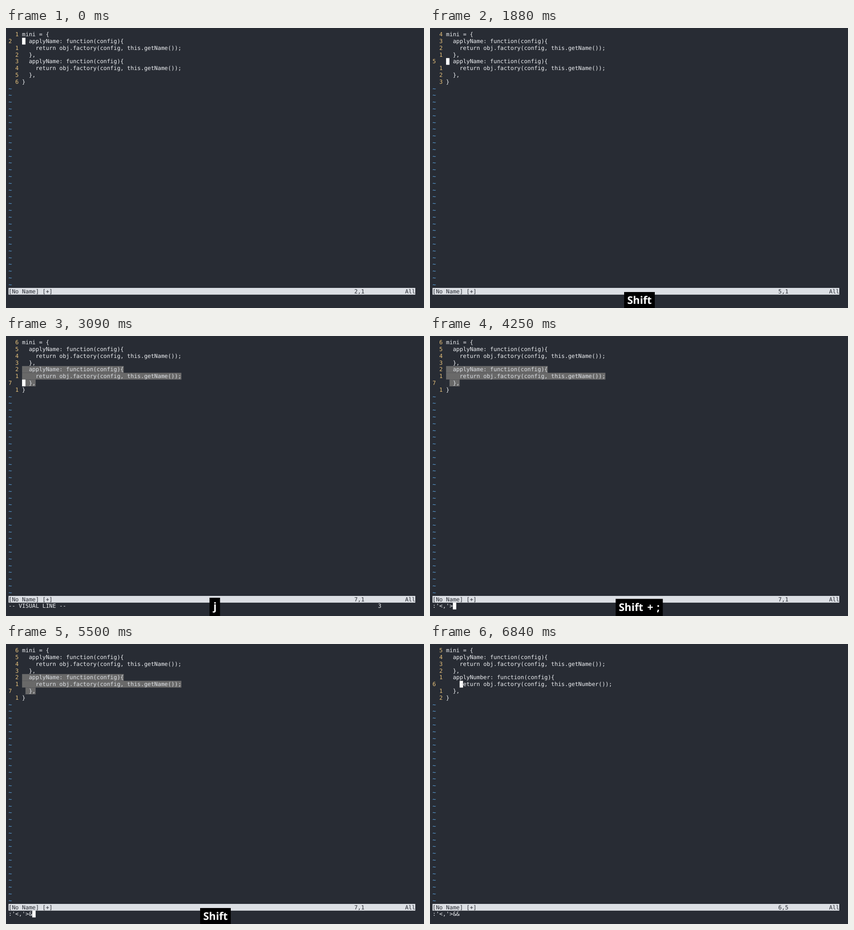
These frames come from a looping animation (913 px wide and 613 px high, 6960 ms). An HTML page:

```html
<!DOCTYPE html>
<html lang="en">
<head>
<meta charset="utf-8">
<title>Repeat a substitution on a selection</title>
<style>
html, body { margin: 0; width: 100%; height: 100%; overflow: hidden; background: #282c34; }
svg { display: block; }
text { white-space: pre; text-rendering: geometricPrecision; }
.term text { font: 12.3px "DejaVu Sans Mono", monospace; }
.keys text { font: bold 23px "Open Sans", "Noto Sans", sans-serif; fill: #fff; text-anchor: middle; }
</style>
</head>
<body>
<svg width="913" height="613" viewBox="0 0 913 613">
  <rect width="913" height="613" fill="#282c34"/>
  <g class="term" id="term"></g>
  <g class="keys" id="keys"></g>
</svg>
<script>
const LOOP = 6960;
const CW = 7.404, RH = 14.8, LEFT = 5.5, TOP = 6.6;
const GUTTER = 4, COLS = 120, STATUS = 38, CMD = 39;
const FG = '#eef0f3', DIM = '#dcdfe4', BG = '#282c34';
const YELLOW = '#e5c07b', BLUE = '#61afef', SELECTED = '#696969';

const method = word => [
  `  apply${word}: function(config){`,
  `    return obj.factory(config, this.get${word}());`,
  '  },'
];
const source = second => ['mini = {', ...method('Name'), ...method(second), '}'];

// Editor states: each entry changes some fields from its time on.
const edits = [
  [0, { row: 1, col: 0, word: 'Name', sel: -1, cmd: '', typing: false, pending: '' }],
  [280, { pending: '3' }],
  [550, { row: 4, pending: '' }],
  [2160, { sel: 4, cmd: '-- VISUAL LINE --', pending: '1' }],
  [2890, { row: 5, pending: '2' }],
  [3090, { row: 6, pending: '3' }],
  [4190, { cmd: ":'<,'>", typing: true, pending: '' }],
  [5500, { cmd: ":'<,'>&" }],
  [5700, { cmd: ":'<,'>&&" }],
  [5970, { row: 5, col: 4, word: 'Number', sel: -1, typing: false }]
];

// Key badges: left, right, top, baseline, then words with their centres.
const shift = x => [['Shift', x + 33.5], ['+', x + 75.5]];
const badges = {
  three: [444.5, 467.5, 579, 605, [['3', 456]]],
  threeJ: [434, 481, 573, 600, [['3', 447.5], ['j', 470.5]]],
  j: [444.5, 467.5, 573, 600, [['j', 456.5]]],
  shift: [424, 491, 578, 604, [['Shift', 457.5]]],
  shiftV: [401, 513, 578, 604, [...shift(401), ['v', 498]]],
  shiftVJ: [391, 523, 573, 600, [...shift(391), ['v', 488], ['j', 512]]],
  colon: [405.5, 508.5, 575.5, 602, [...shift(405.5), [';', 498.5]]],
  colonShift: [372, 543, 575.5, 602, [...shift(372), [';', 465], ['Shift', 508.5]]],
  amp: [401, 513, 578, 604, [...shift(401), ['7', 497.5]]],
  ampEnter: [365.5, 549, 578, 604, [...shift(365.5), ['7', 462], ['Enter', 512.5]]],
  enter: [421, 494, 579, 604, [['Enter', 457.5]]]
};
const presses = [
  [0, ''], [330, 'three'], [610, 'threeJ'], [1150, 'j'], [1430, ''],
  [1880, 'shift'], [2160, 'shiftV'], [2950, 'shiftVJ'], [3010, 'j'], [3910, ''],
  [4040, 'shift'], [4250, 'colon'], [5040, 'colonShift'], [5110, 'shift'],
  [5600, 'amp'], [5970, 'ampEnter'], [6560, 'enter'], [6840, '']
];

const term = document.getElementById('term');
const keys = document.getElementById('keys');
const escape = s => s.replace(/&/g, '&amp;').replace(/</g, '&lt;').replace(/>/g, '&gt;');
const colX = col => LEFT + col * CW;
const rowY = row => TOP + row * RH;

function rect(x, y, w, h, fill) {
  return `<rect x="${x}" y="${y}" width="${w}" height="${h}" fill="${fill}"/>`;
}
function cells(row, col, count, fill) {
  return rect(colX(col), rowY(row), count * CW, RH, fill);
}
function text(row, col, str, fill) {
  return `<text x="${colX(col)}" y="${rowY(row) + 11.5}" fill="${fill}">${escape(str)}</text>`;
}

function drawLine(line, i, s) {
  const here = i === s.row;
  const marked = s.sel >= 0 && i >= s.sel && i <= s.row;
  let out = text(i, here ? 0 : 2, String(here ? i + 1 : Math.abs(i - s.row)), YELLOW);
  if (marked) out += cells(i, GUTTER, line.length, SELECTED);
  if (here && (marked || !s.typing)) out += cells(i, GUTTER + s.col, 1, s.typing ? BG : '#fff');
  const start = line.search(/\S/);
  const body = line.slice(start);
  if (here && s.col === start) {
    out += text(i, GUTTER + start, body[0], DIM);
    return out + text(i, GUTTER + start + 1, body.slice(1), FG);
  }
  return out + text(i, GUTTER + start, body, marked ? DIM : FG);
}

function drawTerm(s) {
  const lines = source(s.word);
  let out = lines.map((line, i) => drawLine(line, i, s)).join('');
  for (let i = lines.length; i < STATUS; i++) out += text(i, 0, '~', BLUE);
  out += cells(STATUS, 0, COLS, DIM);
  out += text(STATUS, 0, '[No Name] [+]', BG);
  out += text(STATUS, 102, `${s.row + 1},${s.col + 1}`, BG);
  out += text(STATUS, 117, 'All', BG);
  out += text(CMD, 0, s.cmd, FG) + text(CMD, 109, s.pending, FG);
  if (s.typing) out += cells(CMD, s.cmd.length, 1, '#fff');
  return out;
}

function drawKeys(name) {
  if (!name) return '';
  const [left, right, top, base, words] = badges[name];
  return rect(left, top, right - left, 613 - top, '#000') +
    words.map(([word, x]) => `<text x="${x}" y="${base}">${word}</text>`).join('');
}

let shown = '';
function render(time) {
  const past = list => list.filter(([start]) => start <= time);
  const done = past(edits), pressed = past(presses);
  const id = done.length + ':' + pressed.length;
  if (id === shown) return;
  shown = id;
  term.innerHTML = drawTerm(Object.assign({}, ...done.map(e => e[1])));
  keys.innerHTML = drawKeys(pressed[pressed.length - 1][1]);
}

const begin = performance.now();
function tick() {
  render((performance.now() - begin) % LOOP);
  requestAnimationFrame(tick);
}
tick();
</script>
</body>
</html>
```
